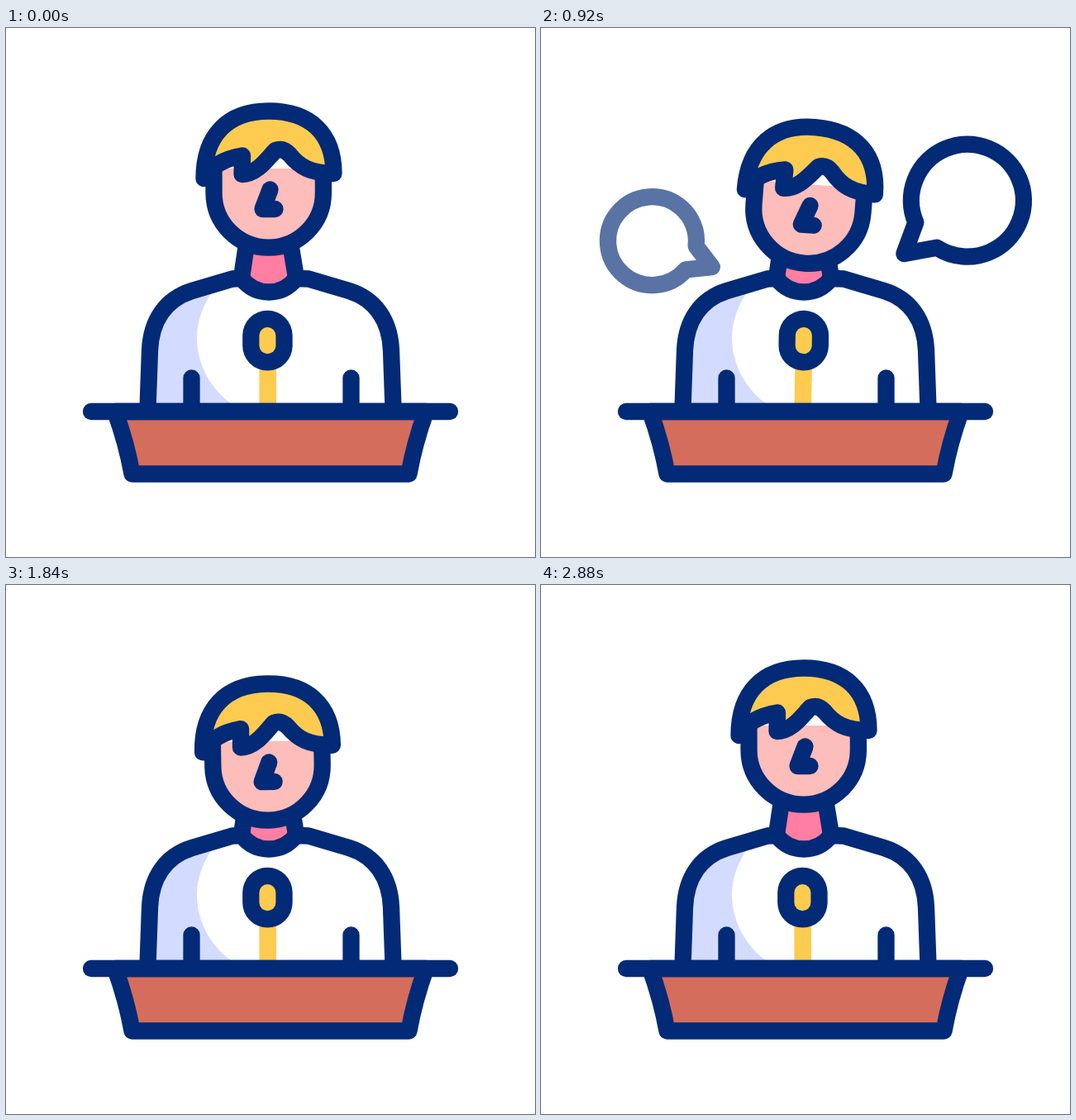
Recreate the animation shown at these times as an HTML page with a canvas. Size 640 by 640 pixels, loop 3 s.

```html
<!DOCTYPE html>
<html lang="en">
<head>
<meta charset="utf-8">
<title>Speaker</title>
<style>
  html, body { margin: 0; width: 100%; height: 100%; overflow: hidden; background: #fff; }
  canvas { display: block; width: 100vw; height: 100vh; }
</style>
</head>
<body>
<canvas id="stage" width="640" height="640"></canvas>
<script>
const ctx = document.getElementById('stage').getContext('2d');
const LOOP = 3000, STEP = 40;
const NAVY = '#032a76', SKIN = '#fdbdba', HAIR = '#fecb51', PINK = '#ff7ea2';
const SHADE = '#d3dcfe', WOOD = '#d56d5c', WHITE = '#fff';
const RAD = Math.PI / 180;

const shape = d => new Path2D(d);

const SHOULDERS = 'M171.5 460L174 390C175.5 354 193 328 225 318L274 303.5L285 303' +
  'Q298 319.5 318 319.5Q338 319.5 351 303L366 303.5L415 318C447 328 464.5 354 466 390L468.5 460';
const body = shape(SHOULDERS);
const bodyShade = shape('M171.5 460L174 390C175.5 354 193 328 225 318L250 311V318' +
  'C237 338 231 356 231 375C231 407 248 437 272 454V460Z');
const neckFill = shape('M293 245L285 303Q298 319.5 318 319.5Q338 319.5 351 303L342 245Z');
const neckSides = shape('M293 248L285 302M342 248L351 302');
const arms = shape('M224.5 423.5V460M417.5 423.5V460');
const desk = shape('M132 464Q146 503 152.5 539.5H487.5Q494 503 508 464Z');
const deskTop = shape('M103 464H537');
const micStem = shape('M316.7 400V464');
const micHead = shape('M316.4 372V384.3');
const face = shape('M251.5 170V199.5A66.2 66.2 0 0 0 383.9 199.5V170');
const hair = shape('M239.5 182C239.5 130 268 100.5 318 100.5C368 100.5 396.5 128 396.5 176' +
  'C368 175.5 355 168 343 153Q335 144.5 326 148C317 157 304 177 285.5 177L286 154.5' +
  'C264 158 247 168 239.5 182Z');
const nose = shape('M319.5 195.5L310.5 219H325.5');

// [time, value] keys joined by sine easing
const headDrop = [[200, 0], [600, 19], [1840, 19], [2240, -9], [2640, 0]];
const headTilt = [[200, 0], [600, 6.4], [800, 6.4], [1200, -2.8], [1600, 6.4],
  [2000, -4.8], [2200, -4.8], [2800, 0]];
const micTilt = [[600, 0], [800, -3], [1000, 3], [1200, -3], [1400, 3], [1600, -3], [1800, 0]];

const bubbles = [
  { x: 514.5, y: 176, bow: 5.4e-5, rise: 82.5, mid: 1080, radius: 68, tip: 100,
    angle: 135.4, turn: -11.4, fade: [[700, 0], [820, 1], [1385, 1], [1505, 0]] },
  { x: 143.3, y: 187, bow: -6e-5, rise: 85.2, mid: 1304, radius: 53.5, tip: 79,
    angle: 34.5, turn: 13.2, fade: [[845, 0], [970, 1], [1610, 1], [1725, 0]] }
];

function track(keys, t) {
  if (t <= keys[0][0]) return keys[0][1];
  for (let i = 1; i < keys.length; i++) {
    const [t0, v0] = keys[i - 1], [t1, v1] = keys[i];
    if (t < t1) return v0 + (v1 - v0) * (1 - Math.cos(Math.PI * (t - t0) / (t1 - t0))) / 2;
  }
  return keys[keys.length - 1][1];
}

function fill(path, color) {
  ctx.fillStyle = color;
  ctx.fill(path);
}

function stroke(path, color = NAVY, width = 20.3) {
  ctx.strokeStyle = color;
  ctx.lineWidth = width;
  ctx.stroke(path);
}

function rotated(x, y, degrees, draw) {
  ctx.save();
  ctx.translate(x, y);
  ctx.rotate(degrees * RAD);
  ctx.translate(-x, -y);
  draw();
  ctx.restore();
}

function drawBubble(b, t) {
  const alpha = track(b.fade, t);
  if (alpha <= 0) return;
  const d = t - b.mid;
  const swing = Math.sin(Math.PI * d / 1234);
  const gap = 17 * RAD;
  ctx.save();
  ctx.globalAlpha = alpha;
  ctx.translate(b.x + b.bow * d * d, b.y - b.rise * swing);
  ctx.rotate((b.angle + b.turn * swing) * RAD);
  const outline = new Path2D();
  outline.arc(0, 0, b.radius, gap, 2 * Math.PI - gap);
  outline.lineTo(b.tip, 0);
  outline.closePath();
  stroke(outline);
  ctx.restore();
}

function drawBody() {
  fill(body, WHITE);
  fill(bodyShade, SHADE);
  fill(neckFill, PINK);
  ctx.lineCap = 'butt';
  stroke(neckSides);
  ctx.lineCap = 'round';
  stroke(body);
  stroke(arms);
}

function drawMic() {
  ctx.lineCap = 'butt';
  stroke(micStem, HAIR, 20.6);
  ctx.lineCap = 'round';
  stroke(micHead, NAVY, 60.5);
  stroke(micHead, HAIR, 20);
}

function drawHead() {
  fill(face, SKIN);
  stroke(face);
  fill(hair, HAIR);
  stroke(hair);
  stroke(nose);
}

function drawDesk() {
  fill(desk, WOOD);
  stroke(desk);
  stroke(deskTop);
}

function render(t) {
  ctx.fillStyle = WHITE;
  ctx.fillRect(0, 0, 640, 640);
  ctx.lineCap = ctx.lineJoin = 'round';
  drawBody();
  rotated(316.7, 464, track(micTilt, t), drawMic);
  drawDesk();
  ctx.save();
  ctx.translate(0, track(headDrop, t));
  rotated(318, 273, track(headTilt, t), drawHead);
  ctx.restore();
  bubbles.forEach(b => drawBubble(b, t));
}

function tick() {
  const t = performance.now() % LOOP;
  render(Math.floor(t / STEP) * STEP);
  requestAnimationFrame(tick);
}
tick();
</script>
</body>
</html>
```
